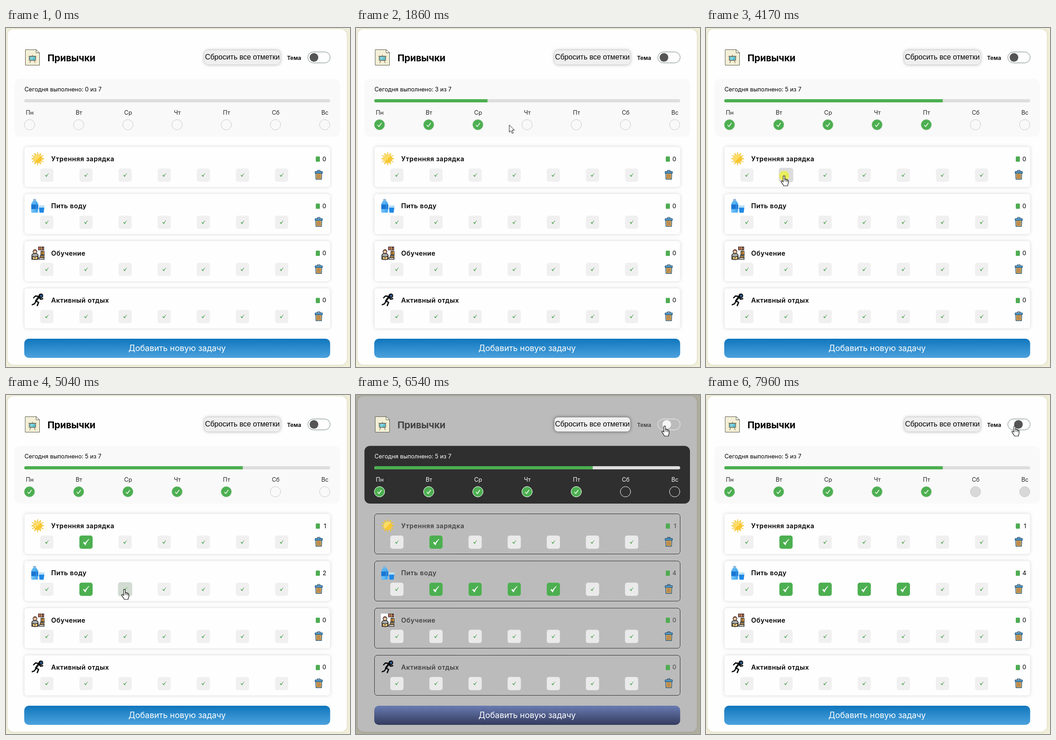
These frames come from a looping animation (754 px wide and 743 px high, 7.99 s). An HTML page with a canvas:

```html
<!DOCTYPE html>
<html lang="ru">
<head>
<meta charset="utf-8">
<title>Привычки</title>
<style>
html, body { margin: 0; width: 754px; height: 743px; overflow: hidden; }
canvas { display: block; }
</style>
</head>
<body>
<canvas id="stage" width="754" height="743"></canvas>
<script>
const ctx = document.getElementById('stage').getContext('2d');
const LOOP = 7990, DARK_ON = 6405, DARK_OFF = 7800;
const GREEN = '#4caf50', INTER = 'Inter, sans-serif', ARIAL = '"Liberation Sans", Arial, sans-serif';
const DAYS = ['Пн', 'Вт', 'Ср', 'Чт', 'Пт', 'Сб', 'Вс'];
const HABITS = ['Утренняя зарядка', 'Пить воду', 'Обучение', 'Активный отдых'];
const dayClicks = [1000, 1340, 1690, 2010, 2340];
const cellClicks = [{1: 4200}, {1: 4680, 2: 5020, 3: 5340, 4: 5630}, {}, {}];
const presses = [...dayClicks, ...cellClicks.flatMap(row => Object.values(row)), DARK_ON, DARK_OFF];

// Pointer stops: time, x, y
const route = [
  [90, 683, 745], [430, 400, 500], [780, 27, 219], [900, 51, 213], [1060, 51, 213],
  [1260, 159, 213], [1400, 159, 213], [1590, 266, 213], [1730, 268, 213], [1950, 374, 213],
  [2070, 376, 213], [2270, 482, 213], [2450, 482, 213], [2750, 478, 268], [3070, 436, 326],
  [3350, 430, 326], [3560, 347, 328], [3770, 261, 326], [3930, 172, 324], [4260, 171, 324],
  [4540, 174, 426], [4730, 174, 426], [4920, 260, 426], [5070, 260, 426], [5240, 346, 426],
  [5390, 346, 426], [5550, 432, 426], [5730, 432, 426], [5910, 655, 296], [6230, 677, 68]
];

const clamp = x => Math.max(0, Math.min(1, x));
const lerp = (a, b, p) => a + (b - a) * p;
const mix = (a, b, p) => 'rgb(' + a.map((v, i) => Math.round(lerp(v, b[i], p))) + ')';
const grey = v => [v, v, v];
const dayX = i => 51.5 + 107.83 * i;
const cellX = i => 89.6 + 85.75 * i;
const rowY = i => 260.5 + 103.3 * i;

// The standard CSS "ease" curve
function ease(x) {
  x = clamp(x);
  let lo = 0, hi = 1, s = x;
  for (let i = 0; i < 16; i++) {
    s = (lo + hi) / 2;
    if (.75 * s * (1 - s) + s ** 3 < x) lo = s; else hi = s;
  }
  return .3 * s * (1 - s) ** 2 + 3 * s * s * (1 - s) + s ** 3;
}

function pointer(t) {
  if (t < route[0][0]) return null;
  const i = route.findIndex(stop => stop[0] > t);
  if (i < 0) return route.at(-1).slice(1);
  const [t0, x0, y0] = route[i - 1], [t1, x1, y1] = route[i];
  const p = (t - t0) / (t1 - t0), s = p * p * (3 - 2 * p);
  return [lerp(x0, x1, s), lerp(y0, y1, s)];
}

function box(x, y, w, h, r, fill, stroke, width = 1) {
  ctx.beginPath();
  ctx.roundRect(x, y, w, h, r);
  paint(fill, stroke, width);
}
function disc(x, y, r, fill, stroke, width = 1) {
  ctx.beginPath();
  ctx.arc(x, y, r, 0, 7);
  paint(fill, stroke, width);
}
function paint(fill, stroke, width) {
  if (fill) { ctx.fillStyle = fill; ctx.fill(); }
  if (stroke) { ctx.strokeStyle = stroke; ctx.lineWidth = width; ctx.stroke(); }
}
function shape(d, fill, stroke, width = 1) {
  const path = new Path2D(d);
  if (fill) { ctx.fillStyle = fill; ctx.fill(path); }
  if (stroke) { ctx.strokeStyle = stroke; ctx.lineWidth = width; ctx.stroke(path); }
}
function at(x, y, draw, scale = 1) {
  ctx.save();
  ctx.translate(x, y);
  ctx.scale(scale, scale);
  draw();
  ctx.restore();
}
function shadow(color, blur, draw) {
  ctx.save();
  ctx.shadowColor = color;
  ctx.shadowBlur = blur;
  draw();
  ctx.restore();
}
function text(str, x, y, font, color, align = 'left', spacing = 0) {
  ctx.font = font;
  ctx.fillStyle = color;
  ctx.textAlign = align;
  ctx.letterSpacing = spacing + 'px';
  ctx.fillText(str, x, y);
}
const tick = color => shape('M-3.4.6L-.9 3.6Q.8-1 3.8-3.8Q.4-.8-1.1 1.6L-2.4.2Z', color, color, .8);

// Habit icons, drawn from the top left corner of a 30 px square
const icons = [
  () => {
    for (let i = 0; i < 12; i++) {
      ctx.save();
      ctx.translate(15, 15);
      ctx.rotate(i * Math.PI / 6);
      shape(i % 2 ? 'M-1.7-10.5L0-14L1.7-10.5Z' : 'M-1-10.5L0-15L1-10.5Z', '#f7c52f', '#f7c52f', .6);
      ctx.restore();
    }
    disc(15, 15, 9.3, '#fff0a0', '#e5b62f', .8);
    shape('M21.5 8.5A9.2 9.2 0 0 1 8.5 21.5Z', '#f9c72e');
    shape('M8.5 21.5A9.2 9.2 0 0 1 21.5 8.5Z', '#fcdc67');
  },
  () => {
    box(5, 0, 6.5, 4, 1, '#8eb5d8');
    shape('M5 4H12L16 10V28Q16 30 14 30H3Q1 30 1 28V10Z', '#58b4f2');
    box(1, 12, 15, 10, 0, '#1976d2');
    box(3, 23, 2, 5, 1, '#8bd1ff');
    box(11, 8, 2, 20, 1, '#3897e6');
    shape('M17 14H30L28 30H19Z', '#b9def5');
    shape('M17.6 19H29.4L28 30H19Z', '#1e88e5');
  },
  () => {
    box(0, 1, 30, 28, 0, '#fff');
    box(16, 1, 13, 8, 0, '#3e3434');
    box(18, 2, 2.5, 6, 0, '#e77158');
    box(22, 2, 2, 6, 0, '#f5bd67');
    shape('M25 7L27 2L28 7Z', '#d86c51');
    box(22, 11, 7, 8, 0, '#f2a93f', '#222', 1.3);
    shape('M25 11V19M20 20H30', null, '#222', 1.3);
    shape('M2 29V21Q2 17 7 16H11Q16 17 16 21V29Z', '#a7aaa9', '#222', 1.4);
    disc(9, 12, 4.2, '#f6cda8', '#222', 1.4);
    shape('M5 12Q5 7 9 7Q13 7 13 12Q9 8 5 12', '#735044');
    shape('M4 22L9 24L15 22V28L9 30L4 28Z', '#ffd07d', '#222', 1.2);
    shape('M9 24V29', null, '#222');
    box(20, 22, 9, 3, 0, '#f2a93f', '#222', 1.2);
    box(18, 25.5, 11, 3.5, 0, '#eee', '#222', 1.4);
  },
  () => {
    ctx.lineCap = ctx.lineJoin = 'round';
    shape('M19 7L11 17L17 20L14 27M11 18L8 23L3 25M18 7L10 6L6 10M18 9L21 13L26 12', null, '#080a0c', 2.7);
    shape('M18 7L11 17', null, '#080a0c', 4);
    disc(22, 5.5, 5, '#080a0c');
    disc(22.5, 5.5, 2.6, '#2e6198');
  }
];

function trash() {
  box(-3, -10.5, 6, 3, 1, null, '#245275', 1.4);
  box(-8, -8, 16, 4, 1, '#5aa6d8', '#245275', 1.3);
  shape('M-6.5-4H6.5L6 9H-6Z', '#ffd073', '#245275', 1.5);
  shape('M-3-2V7M0-2V7M3-2V7', null, '#87502d', 1.6);
}

function logo() {
  shape('M.5 .5H24L31.5 7.5V34.5H.5Z', '#f3efd6', '#59594e');
  shape('M24 .5V7.5H31.5Z', '#fffdf1', '#59594e');
  box(9, 15, 14, 9, 0, '#58bfd0', '#786b51', 1.4);
  shape('M7.5 15H24.5M12 25L10 29.5M20 25L22 29.5M16 12V15', null, '#786b51', 1.2);
  shape('M12 18H18M12 21H16', null, '#dff8fa', 1);
}

function header(dark, p, ink, t) {
  at(42, 47, logo);
  text('Привычки', 91, 73, '700 20.5px ' + INTER, ink, 'left', -.2);
  shadow(dark ? 'rgba(0,0,0,.55)' : 'rgba(0,0,0,.35)', 7, () => box(435, 49, 166, 31, 8, '#efefef'));
  text('Сбросить все отметки', 518, 69, '16px ' + ARIAL, '#000', 'center');
  text('Тема', 616, 70, '600 12.2px ' + INTER, ink);
  box(661.5, 52.5, 49, 24, 12, null, dark ? '#f5f5f5' : '#71877a');
  const slide = t < DARK_OFF ? p : 1 - ease((t - DARK_OFF) / 500);
  disc(675 + 22 * slide, 64.5, 9.5, dark ? '#f5f5f5' : '#555');
}

function week(t, dark) {
  const ink = dark ? '#fff' : '#222', panel = dark ? '#2f2f2f' : '#f9f9f9';
  box(18.5, 111.5, 713.5, 126.5, 12, panel);
  const done = dayClicks.filter(c => t >= c).length;
  text(`Сегодня выполнено: ${done} из 7`, 40.5, 138.5, '12.8px ' + INTER, dark ? '#fff' : '#000');
  const part = dayClicks.reduce((sum, c) => sum + ease((t - c) / 500), 0) / 7;
  ctx.save();
  ctx.beginPath();
  ctx.roundRect(40, 156, 670.5, 7, 3.5);
  ctx.clip();
  box(40, 156, 671, 7, 0, '#dedede');
  box(40, 156, 670.5 * part, 7, 0, GREEN);
  ctx.restore();
  DAYS.forEach((day, i) => {
    const x = dayX(i), p = ease((t - dayClicks[i]) / 200 || 0);
    text(day, x + .5, 190, '12.8px ' + INTER, ink, 'center');
    const fade = t >= DARK_OFF ? 1 - ease((t - DARK_OFF) / 300) : 0;
    disc(x, 212, 11.3, `rgba(51,51,51,${fade})`, dark ? '#fff' : '#c9c9c9');
    ctx.globalAlpha = p;
    disc(x, 212, 11.3, GREEN, dark ? '#fff' : '#8dc791', .9);
    ctx.lineCap = 'round';
    shape(`M${x - 4} 213L${x - 1.2} 216L${x + 4.2} 208.5`, null, '#fff', 1.5);
    ctx.globalAlpha = 1;
  });
}

function habit(row, t, dark, p, back, ink, trail) {
  const y = rowY(row), clicks = cellClicks[row];
  shadow(dark ? 'rgba(255,255,255,.12)' : 'rgba(0,0,0,.16)', 7,
    () => box(40.5, y, 670, 88, 6, back));
  if (dark) box(40.5, y, 670, 88, 6, null, '#303030');
  at(54.5, y + 11, () => icons[row]());
  text(HABITS[row], 99, y + 31.5, '600 14.4px ' + INTER, ink, 'left', .5);
  box(679, y + 21, 9, 11.5, 1.5, '#4fac52');
  const count = Object.values(clicks).filter(c => t >= c).length;
  text(count, 702, y + 31, '13.3px ' + INTER, ink, 'right');
  at(685.5, y + 62, trash);
  for (let i = 0; i < 7; i++) {
    const x = cellX(i), cy = y + 62;
    const hover = trail.filter(q => q && Math.abs(q[0] - x) < 15 && Math.abs(q[1] - cy) < 15).length / trail.length;
    const on = ease((t - clicks[i]) / 200 || 0);
    at(x, cy, () => {
      box(-14.5, -14.5, 29, 29, 5, mix([241, 240, 241], grey(220), Math.max(hover, p)));
      ctx.globalAlpha = on;
      box(-14.5, -14.5, 29, 29, 5, GREEN);
      ctx.globalAlpha = 1;
      at(0, 0, () => tick(mix([76, 165, 80], grey(255), on)), 1 + .65 * on);
    }, 1 + .1 * hover);
  }
}

function overButton(x, y) {
  const inside = (l, t, r, b) => x > l && x < r && y > t && y < b;
  if (inside(661, 52, 711, 77) || inside(434, 48, 602, 81) || inside(40, 681, 711, 723)) return true;
  if (DAYS.some((d, i) => Math.hypot(x - dayX(i), y - 212) < 12)) return true;
  return HABITS.some((h, r) => Math.abs(y - rowY(r) - 62) < 15 &&
    (Math.abs(x - 685.5) < 9 || DAYS.some((d, i) => Math.abs(x - cellX(i)) < 15)));
}

function cursor(t) {
  const pos = pointer(t);
  if (!pos) return;
  if (presses.some(c => t > c - 110 && t < c + 20)) disc(pos[0], pos[1], 11, 'rgba(236,240,72,.85)');
  ctx.lineJoin = 'round';
  at(...pos, () => {
    if (overButton(...pos)) {
      shape('M-2 1.5C-2-.6 1.5-.6 1.5 1.5V8C2 6.3 4.5 6.7 4.5 8.5C5 7.2 7 7.5 7 9.5C8 8.5 9.3 9.3 9.3 11V15C9.3 18 7.7 19 7.7 22H-1C-1 20-5.5 16-6.5 12.5C-6.5 10.5-4 10.5-2 13.5Z', '#fff', '#111', 1.2);
      shape('M1.5 8V12M4.5 9V12.5M7 10V13', null, '#111', .9);
    } else {
      shape('M0 0V15.5L3.7 12L6.2 18L8.8 17L6.3 11H11Z', '#fff', '#111', 1);
    }
  });
}

function draw(t) {
  const dark = t >= DARK_ON && t < DARK_OFF;
  const p = dark ? ease((t - DARK_ON) / 700) : 0;
  const back = mix(grey(254), grey(17), p), ink = mix(grey(0), grey(238), p);
  const trail = Array.from({length: 12}, (_, k) => pointer(t - k * 20));
  ctx.fillStyle = mix([241, 239, 217], [10, 10, 10], p);
  ctx.fillRect(0, 0, 754, 743);
  shadow('rgba(0,0,0,.12)', 4, () => box(3.5, 2.5, 743.5, 735.5, 13, back));
  header(dark, p, ink, t);
  week(t, dark);
  HABITS.forEach((h, row) => habit(row, t, dark, p, back, ink, trail));
  const fill = ctx.createLinearGradient(0, 681, 0, 723);
  fill.addColorStop(0, dark ? '#687bb3' : '#1076bd');
  fill.addColorStop(1, dark ? '#343b5d' : '#4ca2dd');
  box(40, 681, 670.5, 42, 10, fill);
  text('Добавить новую задачу', 375, 708, '18px ' + INTER, '#fff', 'center');
  cursor(t);
}

function frame(now) {
  draw(now % LOOP);
  requestAnimationFrame(frame);
}
requestAnimationFrame(frame);
</script>
</body>
</html>
```
